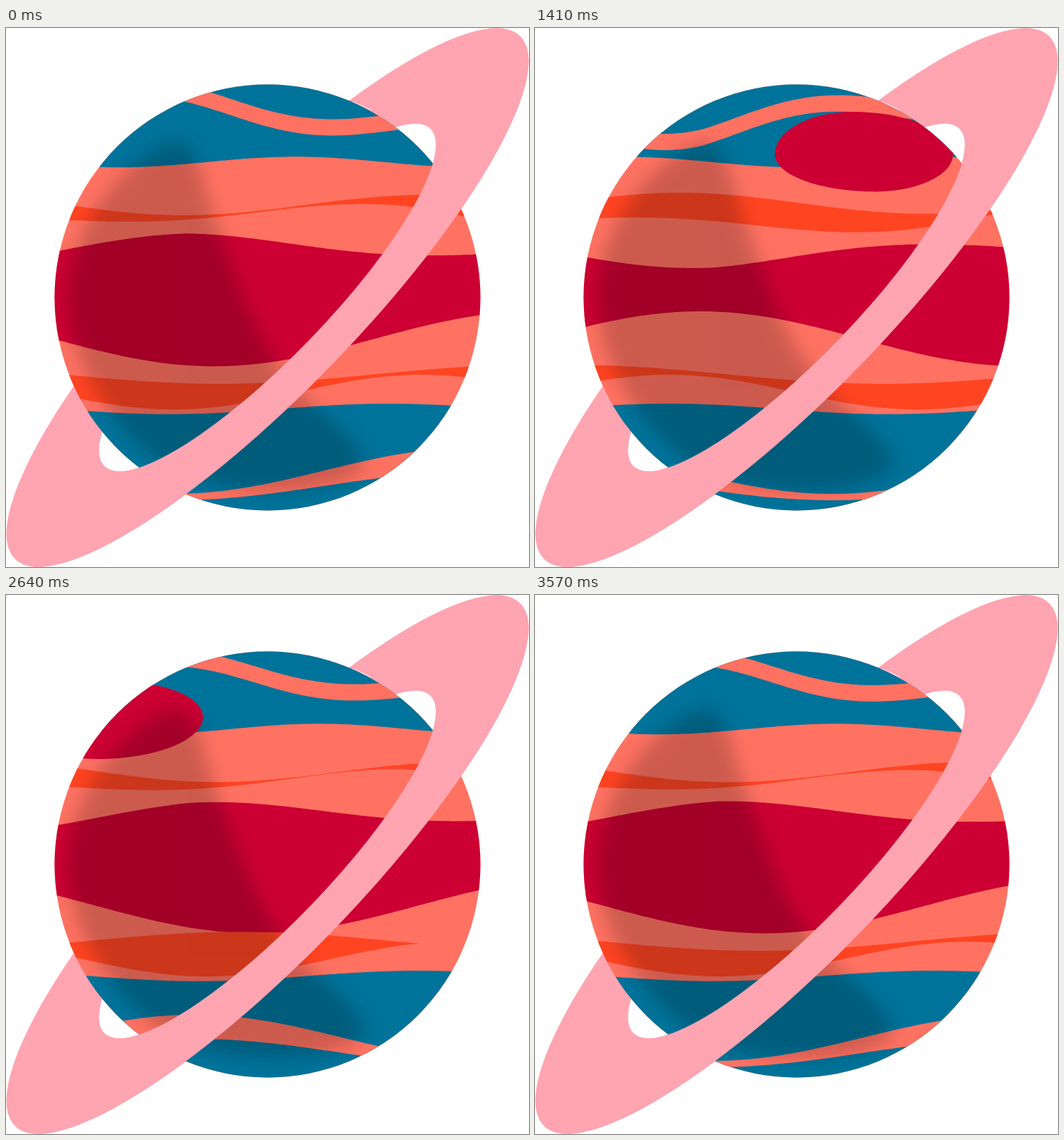
Write an HTML page that moves like this. It is 737x759 px and loops after 3600 ms.

```html
<!DOCTYPE html>
<html lang="en">
<head>
<meta charset="utf-8">
<title>Ringed planet</title>
<style>
  html, body { margin: 0; width: 100%; height: 100%; overflow: hidden; background: #fff; }
  svg { display: block; width: 737px; height: 759px; }
</style>
</head>
<body>
<svg viewBox="0 0 737 759">
  <defs>
    <clipPath id="globe"><circle cx="368.5" cy="379.5" r="300"/></clipPath>
    <clipPath id="front"><rect x="-520" y="0" width="1040" height="140"/></clipPath>
    <filter id="soft" x="-20%" y="-20%" width="140%" height="140%" color-interpolation-filters="sRGB">
      <feGaussianBlur stdDeviation="13"/>
    </filter>
    <path id="ring" fill="#ffa4b1" fill-rule="evenodd"
      d="M-512 0A512 131 0 0 1 512 0A512 131 0 0 1 -512 0ZM-330.5 0A330.5 84 0 0 1 330.5 0A330.5 84 0 0 1 -330.5 0Z"/>
  </defs>
  <use href="#ring" transform="translate(368.5 379.5) rotate(-46)"/>
  <path d="M488 104A300.5 300.5 0 0 1 514 115.500" fill="none" stroke="#fff"/>
  <g clip-path="url(#globe)">
    <rect width="737" height="759" fill="#ff7262"/>
    <g id="bands"></g>
    <path id="spot" fill="#cc0033"/>
    <path filter="url(#soft)" opacity=".2"
      d="M228 163C165 190 90 275 87 380C88 470 150 570 235 622C300 655 440 668 505 620C508 600 475 565 440 538C395 500 358 440 335 380C312 320 292 265 282 230C275 205 270 185 258 170Q244 156 228 163Z"/>
  </g>
  <g transform="translate(368.5 379.5) rotate(-46)"><use href="#ring" clip-path="url(#front)"/></g>
</svg>
<script>
const LOOP = 3600, STEP = 30, TAU = Math.PI * 2;
const BLUE = '#00739a', SALMON = '#ff7262', ORANGE = '#ff4422', CRIMSON = '#cc0033';

// Wave drifting left; its amplitude may change linearly across the globe.
const wave = (mid, amp, x0, length, cycles, slope = 0, cap = 99) => (x, t) => {
  const a = Math.min(cap, Math.max(0, amp + slope * x));
  return mid + a * Math.cos(TAU * ((x - x0) / length + cycles * t / 1800));
};
const flat = y => () => y;

const bands = [
  [BLUE, flat(0), wave(188.8, 7.5, 158, 500, 2)],
  [SALMON, wave(113, 56, 497, 555, 2, -.085, 36), wave(136, 56, 497, 555, 2, -.085, 36)],
  [ORANGE, wave(248, 17.5, 256, 700, 2, -.007), wave(269, -3, 866, 800, 2, .05, 25)],
  [CRIMSON, wave(313.5, 36.5, 676, 800, 2, -.047, 24.5), wave(437.7, 38.7, 293, 905, 2)],
  [ORANGE, wave(487.7, 13.3, 300, 880, 1), wave(512.7, 24.5, 236, 700, 2)],
  [BLUE, wave(536.4, 7.4, 230, 620, 2), flat(759)],
  [SALMON, wave(623.5, 32.5, 237, 840, 1), wave(645, 20, 237, 840, 1)]
].map(([fill, top, bottom]) => {
  const path = document.createElementNS('http://www.w3.org/2000/svg', 'path');
  path.setAttribute('fill', fill);
  document.getElementById('bands').append(path);
  return { path, top, bottom };
});
const spot = document.getElementById('spot');

function bandPath(top, bottom, t) {
  const upper = [], lower = [];
  for (let x = 64; x <= 674; x += 5) {
    const y = top(x, t);
    upper.push(x + ' ' + y.toFixed(2));
    lower.unshift(x + ' ' + Math.max(y, bottom(x, t)).toFixed(2));
  }
  return 'M' + upper.concat(lower).join('L') + 'Z';
}

function spotPath(t) {
  const d = t - 1410, swing = Math.cos(TAU * t / 900), round = .55;
  const cx = 463.5 - .258 * d + 4e-6 * d * d, left = cx - 125.5, right = cx + 125.5;
  const side = 178 - .005 * d, top = 118 + .0035 * d;
  const bottom = 230 + 7 * Math.exp(-(((t - 2080) / 400) ** 2));
  const tx = cx - 4 + 14 * swing, bx = cx - 4 - 22 * swing;
  const up = side + (top - side) * round, down = side + (bottom - side) * round;
  const toward = (from, to) => from + (to - from) * round;
  return `M${left} ${side}C${left} ${up} ${toward(tx, left)} ${top} ${tx} ${top}` +
    `C${toward(tx, right)} ${top} ${right} ${up} ${right} ${side}` +
    `C${right} ${down} ${toward(bx, right)} ${bottom} ${bx} ${bottom}` +
    `C${toward(bx, left)} ${bottom} ${left} ${down} ${left} ${side}Z`;
}

function draw(now) {
  const t = Math.floor(now % LOOP / STEP) * STEP;
  for (const { path, top, bottom } of bands) path.setAttribute('d', bandPath(top, bottom, t));
  spot.setAttribute('d', spotPath(t));
}

let start;
function tick(now) {
  start ??= now;
  draw(now - start);
  requestAnimationFrame(tick);
}
draw(0);
requestAnimationFrame(tick);
</script>
</body>
</html>
```
